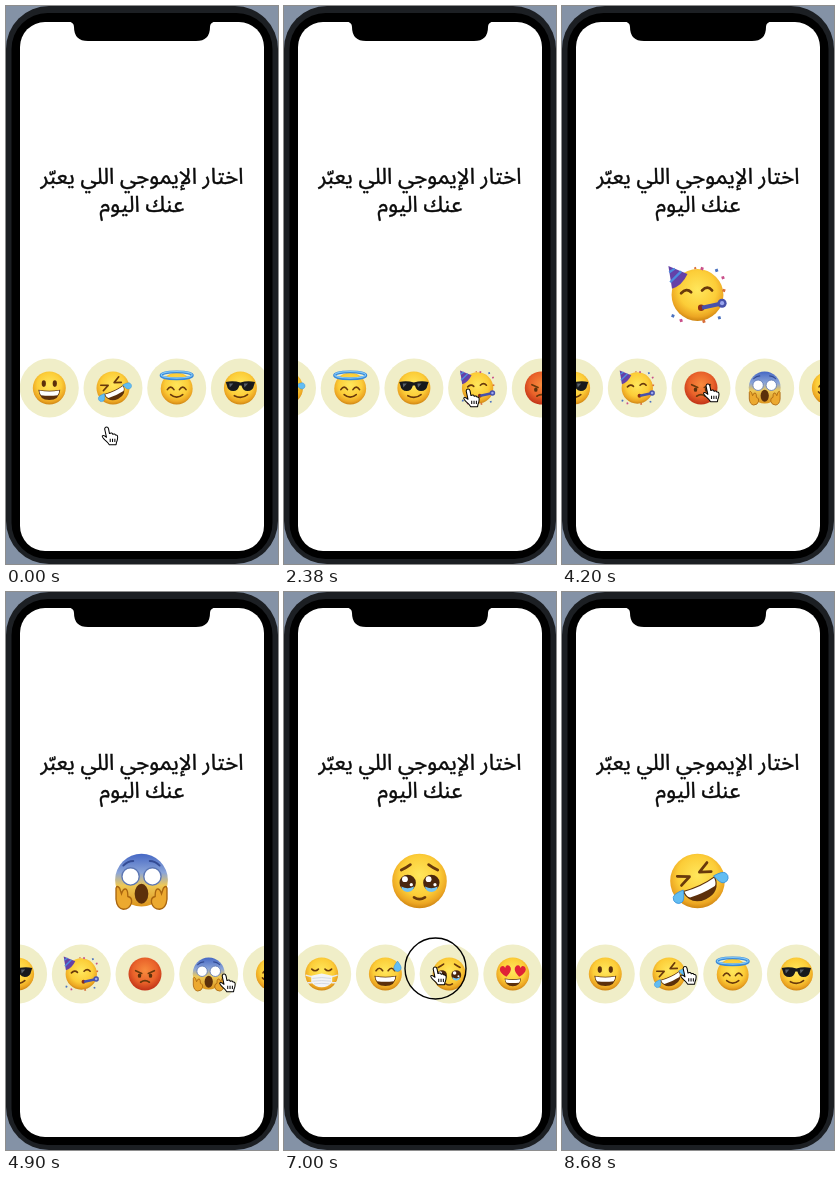
These frames come from a looping animation (272x558 px, 8.96 s). An HTML page:

```html
<!DOCTYPE html>
<html lang="ar">
<head>
<meta charset="utf-8">
<title>Mood picker</title>
<style>
html, body { margin: 0; width: 100%; height: 100%; overflow: hidden; background: #8492a6; }
#stage { display: block; width: 272px; height: 558px; }
.title { font: 400 22px "Noto Sans Arabic", "Noto Sans", "DejaVu Sans", sans-serif; text-anchor: middle; fill: #0b0b0b; stroke: #0b0b0b; stroke-width: .4; }
.face { fill: url(#yellow); }
.line { fill: none; stroke: #69390b; stroke-width: 3; stroke-linecap: round; stroke-linejoin: round; }
.dark { fill: #5c300b; }
.white { fill: #fff; }
.tear { fill: #62bdf2; stroke: #3b95dc; stroke-width: 1; }
</style>
</head>
<body>
<svg id="stage" viewBox="0 0 272 558">
<defs>
  <radialGradient id="yellow" cx=".5" cy=".4" r=".61">
    <stop offset="0" stop-color="#ffe75c"/><stop offset=".6" stop-color="#fccd38"/><stop offset=".85" stop-color="#eca623"/><stop offset="1" stop-color="#cb8211"/>
  </radialGradient>
  <radialGradient id="red" cx=".5" cy=".4" r=".61">
    <stop offset="0" stop-color="#f88c3e"/><stop offset=".6" stop-color="#e9622a"/><stop offset="1" stop-color="#bf3016"/>
  </radialGradient>
  <linearGradient id="fear" x2="0" y2="1">
    <stop offset="0" stop-color="#4567c4"/><stop offset=".36" stop-color="#8ba5d8"/><stop offset=".6" stop-color="#eec856"/><stop offset="1" stop-color="#dc951d"/>
  </linearGradient>
  <clipPath id="screen"><rect x="14" y="16" width="244" height="529" rx="25"/></clipPath>

  <circle id="head" class="face" r="30"/>
  <g id="laugh">
    <path class="dark" d="M-20 3Q0 7 20 3Q18 22 0 22Q-18 22-20 3Z"/>
    <path class="white" d="M-18 4.500Q0 8 18 4.500Q18 11 15 13Q0 15-15 13Q-18 11-18 4.500Z"/>
  </g>
  <path id="happyEyes" class="line" d="M-17-2Q-11-11-5-2M5-2Q11-11 17-2"/>
  <path id="squint" class="line" d="M-18-14L-6-8L-18-3M18-14L6-8L18-3"/>
  <path id="drop" class="tear" d="M0-9Q8 1 6 5Q4 9 0 9Q-4 9-6 5Q-8 1 0-9Z"/>
  <path id="heart" fill="#e02237" d="M0 10Q-11 2-10-5Q-8-11-3-10Q-1-9 0-6Q1-9 3-10Q8-11 10-5Q11 2 0 10Z"/>

  <g id="grin">
    <use href="#head"/><use href="#laugh"/>
    <ellipse class="dark" cx="-10" cy="-8" rx="3.8" ry="6"/><ellipse class="dark" cx="10" cy="-8" rx="3.8" ry="6"/>
  </g>
  <g id="rofl">
    <use href="#head"/>
    <g transform="rotate(-25)">
      <use href="#squint"/><use href="#laugh"/>
      <use href="#drop" transform="translate(-25 7) rotate(55) scale(.9)"/><use href="#drop" transform="translate(25 7) rotate(-55) scale(.9)"/>
    </g>
  </g>
  <g id="angel">
    <circle class="face" cy="1" r="29"/>
    <use href="#happyEyes" y="5"/><path class="line" d="M-11 12Q0 21 11 12"/>
    <ellipse cy="-23" rx="28.500" ry="6.500" fill="none" stroke="#3989d8" stroke-width="5"/>
    <ellipse cy="-24" rx="28" ry="6" fill="none" stroke="#80c7f8" stroke-width="2"/>
  </g>
  <g id="cool">
    <use href="#head"/>
    <g transform="scale(.92)">
      <path fill="#17191c" d="M-29-12Q-14-15 0-11Q14-15 29-12L27-6Q25 6 14 6Q5 6 2-5H-2Q-5 6-14 6Q-25 6-27-6Z"/>
      <path d="M-22-9L-14-9L-21-1ZM7-9H15L8-1Z" fill="#59616a"/>
    </g>
    <path class="line" d="M-11 14Q2 21 13 12"/>
  </g>
  <g id="party">
    <circle class="face" r="28.500"/>
    <path d="M-32-32L-28-7Q-17-10-11-23Z" fill="#6541a8"/>
    <path d="M-31-25L-25-29M-30-14L-18-26" stroke="#4c8be0" stroke-width="2.500"/>
    <path class="line" d="M-18-2Q-12-8-7-3M5-5Q11-11 16-5"/>
    <circle cx="4" cy="14" r="3.500" fill="#8e2e16"/>
    <path d="M5 14L24 10" stroke="#4751ab" stroke-width="4.500"/>
    <circle cx="27" cy="9" r="5" fill="#4751ab"/><circle cx="27" cy="9" r="2.300" fill="#9aa6ee"/>
    <path d="M4-31l3 1-1 3-3-1zM26-20l3-1 1 3-3 1zM-20 27l3-1 1 3-3 1z" fill="#c9508a"/>
    <path d="M19-28l3-1 1 3-3 1zM-28 21l3 1-1 3-3-1zM22 24l3-1 1 3-3 1z" fill="#4b72c0"/>
    <path d="M28-7l3 1-1 3-3-1zM5 28l3-1 1 3-3 1zM-4-30l2-1 1 2-2 1z" fill="#d8703c"/>
  </g>
  <g id="angry">
    <circle r="30" fill="url(#red)"/>
    <path class="line" d="M-17-6L-6-1M17-6L6-1M-8 15Q0 9 8 15"/>
    <ellipse class="dark" cx="-10" cy="3" rx="3.200" ry="4"/><ellipse class="dark" cx="10" cy="3" rx="3.200" ry="4"/>
  </g>
  <g id="scream">
    <circle cy="-1" r="29" fill="url(#fear)"/>
    <path d="M-20-17Q-15-22-9-22M20-17Q15-22 9-22" fill="none" stroke="#334b94" stroke-width="2" stroke-linecap="round"/>
    <g class="white" stroke="#5b76b4" stroke-width="1.500"><circle cx="-12" cy="-5" r="9.500"/><circle cx="12" cy="-5" r="9.500"/></g>
    <ellipse class="dark" cy="14" rx="7.500" ry="11"/>
    <g id="palm"><path d="M-28 8Q-27 4-24 8L-22 14Q-20 8-17 9Q-15 10-15 17Q-10 18-11 24Q-13 31-20 31Q-27 30-28 20Z" fill="#eca92f" stroke="#a9650f" stroke-width="1.500"/></g>
    <use href="#palm" transform="scale(-1 1)"/>
  </g>
  <g id="content">
    <use href="#head"/><use href="#happyEyes"/><path class="line" d="M-18 7Q0 25 18 7"/>
  </g>
  <g id="mask">
    <use href="#head"/><path class="line" d="M-18-9Q-12-3-6-9M6-9Q12-3 18-9"/>
    <path d="M-29 2L-18 5M29 2L18 5M-26 16L-18 16M26 16L18 16" stroke="#e7eaf0" stroke-width="2.500"/>
    <path d="M-19 3Q-8 1 0-1Q8 1 19 3V15Q12 24 0 24Q-12 24-19 15Z" fill="#f3f4f6"/>
    <path d="M-17 8Q0 5 17 8M-17 13Q0 11 17 13M-14 18Q0 16 14 18" fill="none" stroke="#cbd2dc" stroke-width="1.400"/>
  </g>
  <g id="sweat">
    <use href="#head"/><use href="#happyEyes" y="-4"/><use href="#laugh"/>
    <use href="#drop" transform="translate(22 -14) scale(1.05)"/>
  </g>
  <g id="touched">
    <use href="#head"/>
    <path class="line" d="M-20-12Q-14-15-10-18M20-12Q14-15 10-18M-6 18Q0 22 6 18"/>
    <g id="wetEye">
      <circle cx="-13" cy="2" r="9" fill="#4a260d"/>
      <path d="M-20 6Q-13 10-6 6Q-7 12-13 12Q-19 12-20 6Z" fill="#74c4f2"/>
      <circle class="white" cx="-16" cy="-2" r="3.200"/><circle class="white" cx="-9" cy="4" r="1.800"/>
    </g>
    <use href="#wetEye" x="26"/>
  </g>
  <g id="love">
    <use href="#head"/>
    <use href="#heart" transform="translate(-13 -5) rotate(-8)"/><use href="#heart" transform="translate(13 -5) rotate(8)"/>
    <use href="#laugh" transform="translate(0 6) scale(.75)"/>
  </g>
</defs>

<rect width="272" height="558" fill="#8492a6"/>
<rect width="272" height="558" rx="43" fill="#1c1f23"/>
<rect x="5.500" y="7" width="261" height="546" rx="36"/>
<rect x="14" y="16" width="244" height="529" rx="25" fill="#fff"/>
<path d="M62 15.500Q68 16 68 21Q68 35 82 35H190Q204 35 204 21Q204 16 210 15.500Z"/>
<text class="title" x="136" y="178">اختار الإيموجي اللي يعبّر</text>
<text class="title" x="136" y="206">عنك اليوم</text>
<use id="pick" transform="translate(135.500 289) scale(.91)"/>
<g clip-path="url(#screen)"><g id="strip"></g></g>
<circle id="ring" r="30.500" fill="none" stroke="#000" stroke-width="1.400"/>
<g id="hand">
  <path transform="scale(.93)" fill="#fff" stroke="#000" stroke-width="1.100" stroke-linejoin="round"
    d="M-2 1Q-1.500-1 0-1Q1.800-1 2.200 1L3.200 6Q6 4.600 6.700 6.700Q9 5.700 9.700 7.600Q12 7.200 12 10Q12 13 10.700 15.500L10.300 18H3Q1 15-1.500 13Q-5 9.500-4.500 8.500Q-3 7 0 10ZM4 11.500V15M6.500 11.500V15M9 11.500V15"/>
</g>
</svg>
<script>
const LOOP = 8960, STEP = 70, PITCH = 63.7;
const moods = ['grin', 'rofl', 'angel', 'cool', 'party', 'angry', 'scream', 'content', 'mask', 'sweat', 'touched', 'love'];
const $ = id => document.getElementById(id);

const linear = u => u;
const out = u => 1 - (1 - u) ** 2;
const smooth = u => u * u * (3 - 2 * u);

// Keys: time, value(s), easing into the key
const scroll = [
  [490, 0], [910, 80, smooth], [980, 80], [1400, 104.5, out],
  [3360, 104.5], [3710, 177], [4060, 222.8, out],
  [5250, 222.8], [5530, 355], [5880, 532, out], [6020, 523.2], [6300, 515.2, out],
  [7070, 515.2], [7420, 370], [7700, 155], [7980, -8, out], [8260, 0, smooth]
];
const hand = [
  [0, 100.5, 422], [350, 208, 382, smooth], [490, 208, 382], [910, 128, 382, smooth],
  [980, 128, 382], [1400, 104, 384, out], [1750, 104, 384], [2100, 184, 384, smooth],
  [2380, 184, 384], [2450, 179, 386], [3150, 179, 386], [3360, 225, 382, smooth],
  [3710, 152, 378], [3850, 128, 378, out], [4060, 128, 378], [4550, 218, 383, smooth],
  [5250, 218, 383], [5530, 121, 382], [5740, 121, 382], [6020, 172, 382, smooth],
  [6440, 151, 376, smooth], [7070, 151, 376], [7420, 225, 378, out], [7980, 225, 378],
  [8330, 123, 375.5, smooth]
];
const picks = [[2730, 'party'], [4900, 'scream'], [6580, 'touched'], [8610, 'rofl']];
const presses = [[2450, 2730], [7000, 7140], [8470, 8610]];

function at(keys, t, i = 1) {
  const n = keys.findIndex(k => k[0] > t);
  if (n === 0) return keys[0][i];
  if (n < 0) return keys.at(-1)[i];
  const a = keys[n - 1], b = keys[n];
  const ease = typeof b.at(-1) === 'function' ? b.at(-1) : linear;
  return a[i] + (b[i] - a[i]) * ease((t - a[0]) / (b[0] - a[0]));
}

const move = (el, x, y) => el.setAttribute('transform', `translate(${x} ${y})`);

$('strip').innerHTML = moods.map((id, i) =>
  `<g transform="translate(${43.3 + i * PITCH} 382)"><circle r="29.5" fill="#f0eec8"/><use href="#${id}" transform="scale(.55)"/></g>`
).join('');

let shown;
function draw(now) {
  const t = Math.floor(now % LOOP / STEP) * STEP;
  const x = at(hand, t), y = at(hand, t, 2);
  move($('strip'), -at(scroll, t), 0);
  move($('hand'), x, y);
  move($('ring'), x + 0.5, y + 0.5);
  $('ring').style.display = presses.some(([a, b]) => t >= a && t < b) ? '' : 'none';
  const pick = picks.filter(p => p[0] <= t).at(-1)?.[1] ?? '';
  if (pick !== shown) {
    $('pick').setAttribute('href', '#' + pick);
    $('pick').style.display = pick ? '' : 'none';
    shown = pick;
  }
}

let start;
function tick(now) {
  start ??= now;
  draw(now - start);
  requestAnimationFrame(tick);
}
draw(0);
requestAnimationFrame(tick);
</script>
</body>
</html>
```
